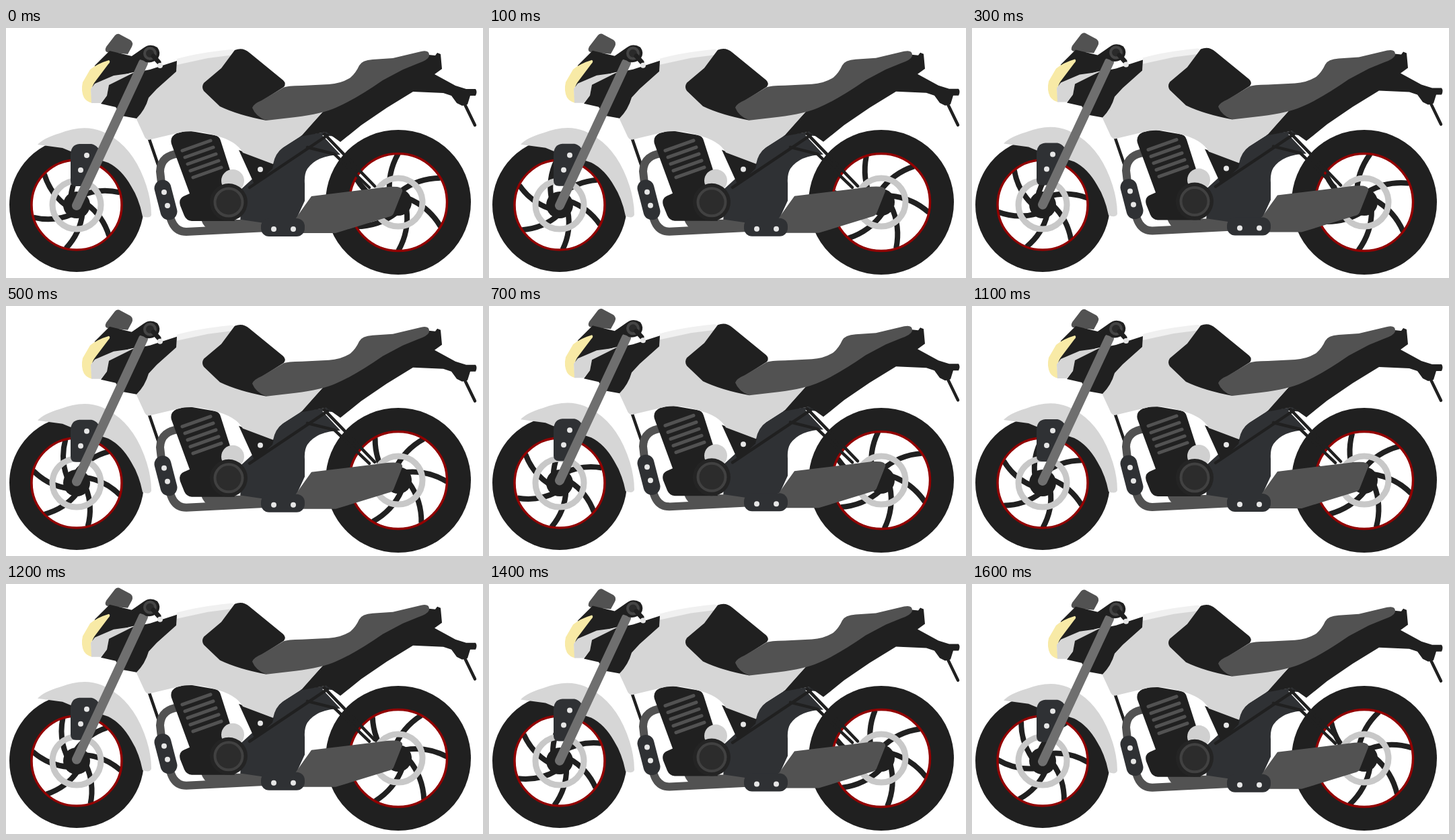
Animation of 709 by 373 pixels, one loop 1.7 s. Source, as an HTML page:

```html
<!DOCTYPE html>
<html lang="en">
<head>
<meta charset="utf-8">
<title>Motorcycle</title>
<style>
  html, body { margin: 0; width: 100%; height: 100%; overflow: hidden; background: #fff; }
  svg { display: block; width: 709px; height: 373px; }
  .ink { fill: #202020; }
  .slate { fill: #2f3134; }
  .steel { fill: #525252; }
  .pale { fill: #d6d6d6; }
  .dot { fill: #e6e6e6; }
  .line { fill: none; stroke: #202020; stroke-width: 4.5; stroke-linecap: round; stroke-linejoin: round; }
</style>
</head>
<body>
<svg viewBox="0 0 709 373" xmlns="http://www.w3.org/2000/svg">
  <g id="wheels"></g>

  <g id="body">
    <!-- frame and rear linkage -->
    <path class="line" d="M213 166 L226 204"/>
    <path class="slate" d="M398 196 Q400 186 412 178 L440 160 L470 156 L526 143 L502 163 L470 160 L497 189 Q462 190 448 210 Q443 218 444 232 L444 258 L432 284 L384 294 L348 294 L350 240 Z"/>
    <path class="line" d="M362 238 L478 160 M448 178 L488 188 L540 238 M473 158 L548 236"/>
    <path class="ink" d="M346 182 L398 203 L396 210 L370 235 Z"/>
    <circle class="dot" cx="378" cy="211" r="4"/>

    <!-- exhaust pipe -->
    <path d="M262 187 Q230 188 229 214 L232 240 L244 282 Q250 304 268 304 L388 298" fill="none" stroke="#525252" stroke-width="12"/>
    <path class="steel" d="M290 286 H350 L384 291 V302 H304 Q294 298 290 286 Z"/>

    <!-- engine -->
    <path class="ink" d="M246 173 Q243 162 254 157 L270 153 L310 160 Q317 161 319 168 L333 212 L322 236 L340 288 L276 288 Q268 287 265 280 L259 265 Q256 255 264 251 L273 247 Z"/>
    <circle cx="337" cy="228" r="17" fill="#d0d0d0"/>
    <g id="fins" stroke="#525252" stroke-width="5" stroke-linecap="round"></g>
    <circle cx="331" cy="260" r="28" fill="#242424"/>
    <circle cx="331" cy="260" r="20.5" fill="#2c2c2c" stroke="#414141" stroke-width="4"/>
    <path d="M233 239 L242 274" stroke="#2f3134" stroke-width="25" stroke-linecap="round"/>
    <circle class="dot" cx="235" cy="245" r="4"/>
    <circle class="dot" cx="240" cy="265" r="4"/>

    <!-- muffler -->
    <path class="steel" d="M430 285 L444 265 L454 251 L568 237 Q591 235 589 244 L576 277 Q574 281 568 282 L490 306 L438 306 Z"/>
    <rect class="slate" x="379" y="284" width="65" height="27" rx="12"/>
    <circle class="dot" cx="398" cy="300" r="4"/>
    <circle class="dot" cx="427" cy="300" r="4"/>

    <!-- tail -->
    <path class="ink" d="M470 126 L512 95 L560 70 L612 45 L628 40 L638 41 L641 37 L646 39 L648 61 L637 69 L668 86 L684 91 L698 91 Q701 95 698 101 L690 101 L686 114 L678 116 L670 112 L662 101 L650 97 L605 95 L566 119 L528 145 L497 170 L476 155 L437 162 Z"/>
    <path class="line" d="M682 114 L697 145"/>

    <!-- tank, cover and seat -->
    <path class="pale" d="M250 52 L300 42 L342 37 L300 85 L385 136 L470 126 L440 160 L412 178 Q400 187 397 203 L352 186 Q342 168 310 160 Q285 152 262 155 L212 167 Q207 166 205 160 L193 134 L208 98 Z"/>
    <path d="M254 46 Q285 37 335 32 Q342 32 339 40 L300 45 L254 55 Z" fill="#f0f0f0"/>
    <path class="ink" d="M340 33 Q352 28 362 37 L412 78 Q417 83 413 88 L372 114 L387 138 Q345 130 318 117 L294 94 Q290 88 294 82 L320 60 Z"/>
    <path class="steel" d="M366 119 Q368 113 380 108 L412 89 Q418 86 440 86 L480 84 Q498 83 512 74 Q520 67 525 56 Q529 48 545 47 L575 45 L617 35 Q630 32 629 42 Q627 48 612 53 L590 62 L560 78 Q520 106 490 119 Q470 128 430 133 L387 138 Q371 132 366 119 Z"/>

    <!-- front fender -->
    <path class="pale" d="M47 174 Q56 164 80 157 Q115 143 142 154 Q180 170 200 213 Q216 248 216 279 Q214 285 203 281 Q198 255 186 236 Q172 211 152 201 L140 197 L128 186 L96 184 L84 179 Z"/>
    <path class="slate" d="M96 190 Q96 174 109 173 L127 173 Q138 175 142 191 L121 236 L104 236 Q96 236 96 228 Z"/>
    <circle class="dot" cx="120" cy="190" r="4"/>
    <circle class="dot" cx="111" cy="212" r="4"/>

    <!-- headlight and handlebar -->
    <path class="steel" d="M162 11 Q166 7 170 10 L185 18 Q190 22 187 28 L181 39 L150 36 Q146 34 149 28 Z"/>
    <path class="ink" d="M154 34 L187 42 L207 29 L204 63 L185 67 L160 74 L128 90 L132 56 Z"/>
    <path d="M153 48 Q156 50 152 54 L131 82 L126 92 L128 112 Q120 110 116 104 Q111 94 114 81 L125 62 Q136 53 153 48 Z" fill="#f8eaa6"/>
    <path class="pale" d="M132 83 L160 71 L189 67 L153 85 L150 101 L141 112 L127 112 L126 91 Z"/>
    <path class="ink" d="M153 85 L189 67 L214 62 L254 49 L253 65 L224 91 L212 104 Q207 122 194 135 L172 131 L163 118 L141 113 L150 101 Z"/>
    <path d="M204 52 L105 265" stroke="#6f6f6f" stroke-width="14" stroke-linecap="round"/>
    <path class="ink" d="M187 42 L204 30 Q214 22 225 29 Q231 37 226 45 Q219 53 208 51 Q202 46 188 46 Z"/>
    <circle cx="214" cy="38" r="8" fill="#2a2a2a" stroke="#454545" stroke-width="4"/>
    <path class="line" d="M219 42 L227 51" style="stroke-width:7"/>
    <circle class="dot" cx="229" cy="56" r="4"/>
  </g>
</svg>

<script>
const LOOP = 1700, STEP = 100, LIFT = 5, TURN = 720;
const $ = id => document.getElementById(id);

const wheels = [
  { x: 105, y: 264, tyre: 100, rim: 67, phase: 30 },
  { x: 583, y: 260, tyre: 108, rim: 72.5, phase: 16 }
];

const circle = (r, attrs) => `<circle r="${r}" ${attrs}/>`;

// Six curved spokes that sweep forward from hub to rim.
function spokes(rim) {
  const at = (x, y) => `${x * rim} ${y * rim}`;
  const d = `M${at(0.18, -0.13)} Q${at(0.63, -0.08)} ${at(0.97, 0.24)}`;
  return [0, 1, 2, 3, 4, 5].map(i => `<path d="${d}" transform="rotate(${i * 60})"/>`).join('');
}

$('wheels').innerHTML = wheels.map(w => `
  <g transform="translate(${w.x} ${w.y})">
    ${circle(w.tyre, 'class="ink"')}
    ${circle(w.rim, 'fill="#fff"')}
    <g class="spin" fill="none" stroke="#202020" stroke-width="8">${spokes(w.rim)}</g>
    ${circle(w.rim, 'fill="none" stroke="#920000" stroke-width="3.5"')}
    ${circle(36, 'fill="none" stroke="#c8c8c8" stroke-width="9"')}
    ${circle(20, 'class="ink"')}
  </g>`).join('');

$('fins').innerHTML = [0, 1, 2, 3, 4].map(i =>
  `<path d="M${262 + i * 4} ${183 + i * 10} L${304 + i * 4} ${168 + i * 10}"/>`).join('');

const spins = document.querySelectorAll('.spin');

function draw(ms) {
  const p = Math.floor((ms % LOOP) / STEP) * STEP / LOOP;
  const lift = LIFT * (1 - Math.cos(2 * Math.PI * p)) / 2;
  $('body').setAttribute('transform', `translate(0 ${-lift})`);
  spins.forEach((s, i) => s.setAttribute('transform', `rotate(${wheels[i].phase + TURN * p})`));
}

const start = performance.now();
function tick() {
  draw(performance.now() - start);
  requestAnimationFrame(tick);
}
tick();
</script>
</body>
</html>
```
